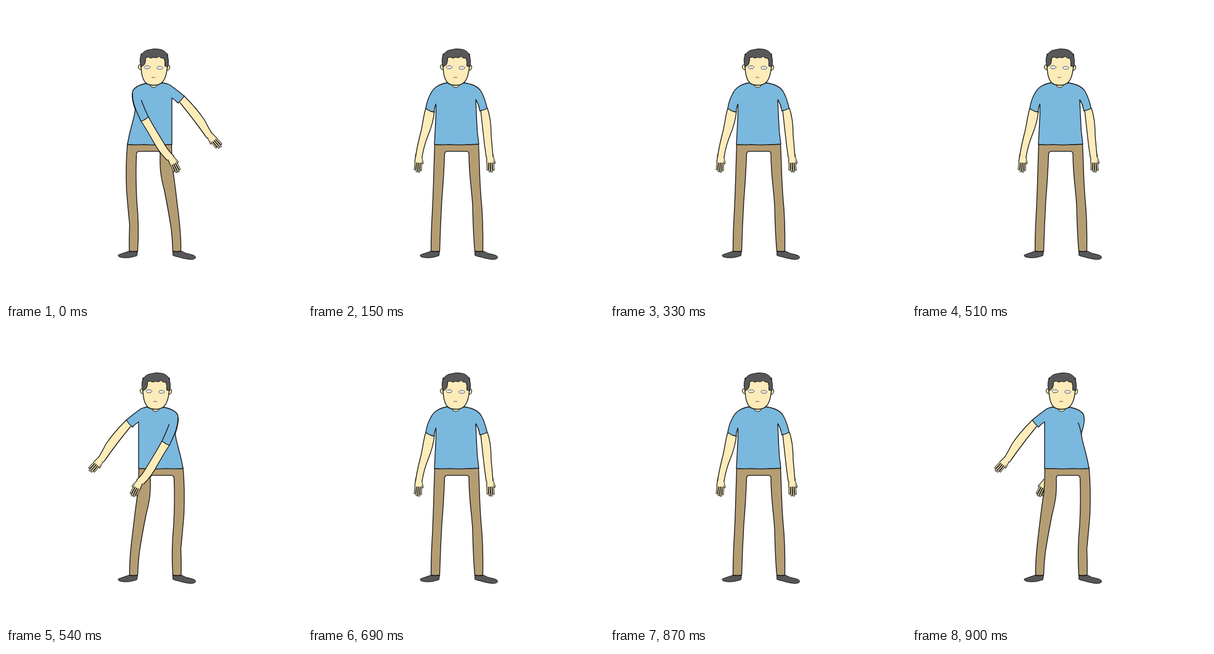
Recreate the animation shown at these times as an HTML page with a canvas. Size 480 by 480 pixels, loop 1.05 s.

```html
<!DOCTYPE html>
<html lang="en">
<head>
<meta charset="utf-8">
<title>Hip swing dance</title>
<style>
html, body { margin: 0; width: 100%; height: 100%; overflow: hidden; background: #fff; }
canvas { display: block; width: 480px; height: 480px; }
</style>
</head>
<body>
<canvas id="stage" width="480" height="480"></canvas>
<script>
const ctx = document.getElementById('stage').getContext('2d');
const INK = '#161616', SKIN = '#fdecb9', SHIRT = '#7ab8de',
      PANTS = '#b59d73', HAIR = '#58585a', SHOE = '#57575a';
const LOOP = 1050, BEAT = 180, HOLD = 150;
const AXIS = 242;

function fill(d, color) {
  ctx.fillStyle = color;
  ctx.fill(new Path2D(d));
}

function line(d, width = 1.3, color = INK) {
  ctx.strokeStyle = color;
  ctx.lineWidth = width;
  ctx.stroke(new Path2D(d));
}

function shape(d, color, width) {
  fill(d, color);
  line(d, width);
}

// A hand hanging down from the wrist; thumb is -1 or 1.
function hand(x, y, angle, thumb) {
  const fingers = 'M-4.3 10L-5 22M-1.5 11L-1.8 25M1.5 11L1.7 25.5M4.3 10L4.9 23';
  const thumbLine = `M${thumb * 4.5} 3L${thumb * 7} 11.5`;
  ctx.save();
  ctx.translate(x, y);
  ctx.rotate(angle);
  line(fingers + thumbLine, 3.2);
  fill('M-5 -2L-5.8 11L5.8 11L5 -2Z', SKIN);
  line('M-5 -2L-5.8 11M5 -2L5.8 11', 1.2);
  line(fingers + thumbLine, 1.3, SKIN);
  ctx.restore();
}

// Two edges: down one side, back up the other.
function arm(down, up) {
  fill(`M${down}L${up}Z`, SKIN);
  line(`M${down}M${up}`);
}

function shoes() {
  shape('M200 397.5L213 398Q213.5 402 212 405Q206 407 200 408Q190 409 184 407Q180.5 405 182.5 403.5Q189 401 200 397.5Z', SHOE, 1);
  shape('M271 398L284.5 397.5Q291 401.5 300 403Q307.5 404.5 307.5 408Q306 411.5 298 411Q287 409.5 280 407Q274 406 271 404.5Z', SHOE, 1);
}

function head(dx) {
  ctx.save();
  ctx.translate(dx, 0);
  shape('M233.5 127Q234.5 132 239.5 132Q244.5 132 245.5 127Z', SKIN, 1.1);
  shape('M219 95.5Q214.5 94.5 214.5 99Q215.5 103.5 219.5 103.5Z', SKIN, 1.1);
  shape('M262 95.5Q266 95.5 265.5 100Q264.5 104.5 261 104.5Z', SKIN, 1.1);
  shape('M219 78C218 104 220 117 226 124Q230 128.5 240 128.5Q249 128.5 254 123C260 116 263 104 262 78Z', SKIN);
  shape('M219 98.5Q215.5 88 219 80Q223 72 232 71Q240 68.5 248 70Q257 71 261 78Q265 88 262.5 98.5L257.5 97.5' +
        'Q258.5 90 256 84.5Q251 85.5 248.5 81.5Q244 85.5 239.5 83Q234 86 231 82.5Q229 84 226.5 83.5' +
        'Q227 90 224.5 95Q222 97.5 219 98.5Z', HAIR, 1);
  for (const [x, y] of [[229, 99.3], [249.5, 100.3]]) {
    ctx.beginPath();
    ctx.ellipse(x, y, 4.6, 2.4, 0, 0, 7);
    ctx.fillStyle = '#fff';
    ctx.fill();
    ctx.strokeStyle = '#4b4b52';
    ctx.lineWidth = 1;
    ctx.stroke();
    line(`M${x - 1.5} ${y}L${x + 1.5} ${y}`, 1.2, '#c9cbd6');
  }
  line('M236.5 116Q239 115.5 241.5 116', 1.2, '#6b5b3c');
  ctx.restore();
}

function standing() {
  shoes();
  shape('M205.5 224C204 262 203.5 300 201.5 335Q199.5 370 199.5 397.5Q207 399 213.5 397.5C214 380 215 350 217 315Q220 280 221.5 240Q222 236 226 235.7' +
        'L257 235.7Q261 236 261 240C261 275 266 300 267 325Q268 370 270.5 397.5Q277 399 283.5 397.5C284 370 284 345 280.5 310C278 280 278 250 276.5 224Z', PANTS);
  hand(179.5, 243, 0.06, 1);
  hand(295, 243, -0.05, 1);
  arm('191 166C187 178 186 194 182 208Q176 232 174.5 245', '185 245Q188 226 195 209Q203 190 205 171');
  arm('291 166C296 180 297 195 297 210Q299 232 300 244', '289 245Q286 225 284 205Q282 187 280 169');
  shape('M226 124.5C211 127 203 133 198 144Q193 153 191 166Q197 171 204.5 172Q205 164 207.5 159Q208 176 206.5 195L205 224.5' +
        'Q217 225.5 230 224.7Q244 226 258 224.7Q267 225 277 224Q274 204 273.5 185L272 152Q277 159 278.5 170Q285 169 290.5 166' +
        'Q287 150 281 139Q274 127 252 124.5Z', SHIRT);
  head(0);
}

// Hips to the left, both arms to the right.
function swing(behind) {
  if (behind) hand(267, 246, -0.46, 1);
  shape('M197 223C194.5 248 194.5 275 195.5 300Q198 330 200.5 355Q199.5 380 200 397.5Q207 399 213.5 397.5C215 375 215 345 212 315Q210 275 211.5 240' +
        'Q212 236 216 235.7L246 235.7Q250 236 250 240C249 268 252 280 257 300Q264 335 268 362Q270 380 270.5 397.5Q277 399 283.5 397.5' +
        'C284.5 370 280.5 345 277 315Q273.5 285 270 262Q268.5 244 268.5 223Z', PANTS);
  hand(330, 209.5, -0.72, -1);
  arm('289 146C301 158 314 173 322 185Q328 197 333.5 206', '325.5 214Q320 206 312 195Q298 176 282 156.5');
  shape('M227 125.5C216 128 208 132 205.5 138C203 147 206 158 209.5 168C208 184 201 198 197 224.5Q209 225.5 225 224.7Q240 226 253 224.7' +
        'Q260 225 269 224.5L269 149Q274 152 279 157.5Q285 152 289 146Q277 136 265 127.5Q259 125 252 124.5Z', SHIRT);
  if (behind) {
    line('M214.5 150.5Q211.5 158 209 170');
    return;
  }
  hand(267, 246, -0.46, 1);
  arm('231 180C238 193 246 206 254 219Q262 234 272 243', '261 250Q248 237 239 220Q229 202 219 186.5');
  fill('M205.5 146Q206 160 219 187Q225 185 231 180L219 153Z', SHIRT);
  line('M205 142C205 160 213 173 219 187Q225 185 231 180Q225 168 219.5 153');
}

function sway(left, behind) {
  shoes();
  ctx.save();
  if (left) {
    ctx.translate(2 * AXIS, 0);
    ctx.scale(-1, 1);
  }
  swing(behind);
  ctx.restore();
  head(left ? 3 : 0);
}

function draw(now) {
  const t = now % LOOP;
  const beat = Math.floor(t / BEAT);
  ctx.fillStyle = '#fff';
  ctx.fillRect(0, 0, 480, 480);
  if (t % BEAT < HOLD) sway(beat % 2 === 1, beat % 3 === 2);
  else standing();
}

ctx.lineCap = ctx.lineJoin = 'round';
const start = performance.now();
function tick() {
  draw(performance.now() - start);
  requestAnimationFrame(tick);
}
tick();
</script>
</body>
</html>
```
